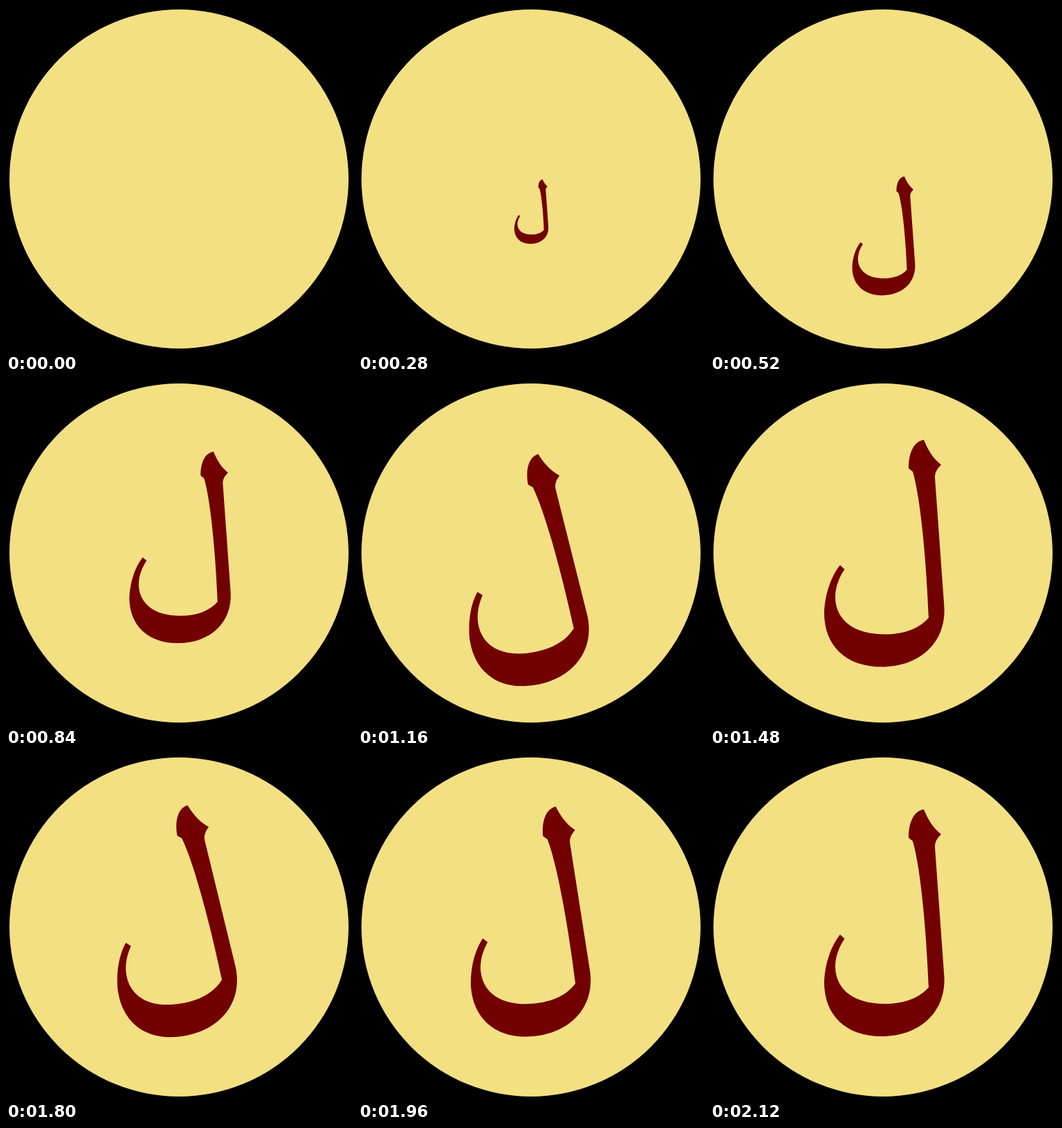
Recreate the animation shown at these times as an HTML page with a canvas. Size 500x500 px, loop 2800 ms.

```html
<!DOCTYPE html>
<html lang="ar">
<head>
<meta charset="utf-8">
<title>Lam</title>
<style>
  html, body { margin: 0; width: 100%; height: 100%; overflow: hidden; background: #000; }
  canvas { display: block; width: 500px; height: 500px; }
</style>
</head>
<body>
<canvas id="stage" width="500" height="500"></canvas>
<script>
const ctx = document.getElementById('stage').getContext('2d');
const LOOP = 2800, STEP = 40, LAST = 53, GROW = 25;
const PIVOT = { x: 250, y: 355 };

const lam = new Path2D(
  'M309 80 C314 92 321 106 334 116 C328 122 325 127 325 134 ' +
  'L338.5 322 C341 374 302 408 248 408 C196 408 165 377 165 330 ' +
  'C166 303 175 277 188 261 L194.5 267 C187 278 181 292 181 308 ' +
  'C182 342 210 361 252 361 C280 361 302 353 316 337 ' +
  'C313 262 305 167 293 126 L287 121 C287 98 295 82 309 80 Z');

// step, vertical offset, tilt in degrees
const keys = [
  [0, -105, 0],
  [13, 35.4, 0],
  [21, -19.4, 0],
  [29, 33, -10],
  [37, 6.5, 0],
  [45, 0, -9.6],
  [LAST, 0, 0]
];

function pose(n) {
  let i = 0;
  while (i < keys.length - 2 && n > keys[i + 1][0]) i++;
  const [n0, y0, r0] = keys[i], [n1, y1, r1] = keys[i + 1];
  const k = (1 - Math.cos(Math.PI * (n - n0) / (n1 - n0))) / 2;
  return {
    y: y0 + (y1 - y0) * k,
    tilt: r0 + (r1 - r0) * k,
    size: Math.min(1, (n + 0.1) / GROW)
  };
}

function draw(ms) {
  const n = Math.min(LAST, Math.floor(ms / STEP));
  ctx.fillStyle = '#000';
  ctx.fillRect(0, 0, 500, 500);

  ctx.fillStyle = '#f3e083';
  ctx.beginPath();
  ctx.arc(250, 250, 245, 0, Math.PI * 2);
  ctx.fill();
  if (n === 0) return;

  const p = pose(n);
  ctx.save();
  ctx.clip();
  ctx.translate(PIVOT.x, PIVOT.y + p.y);
  ctx.rotate(p.tilt * Math.PI / 180);
  ctx.scale(p.size, p.size);
  ctx.translate(-PIVOT.x, -PIVOT.y);
  ctx.fillStyle = '#730000';
  ctx.fill(lam);
  ctx.restore();
}

const start = performance.now();
function tick() {
  draw((performance.now() - start) % LOOP);
  requestAnimationFrame(tick);
}
tick();
</script>
</body>
</html>
```
